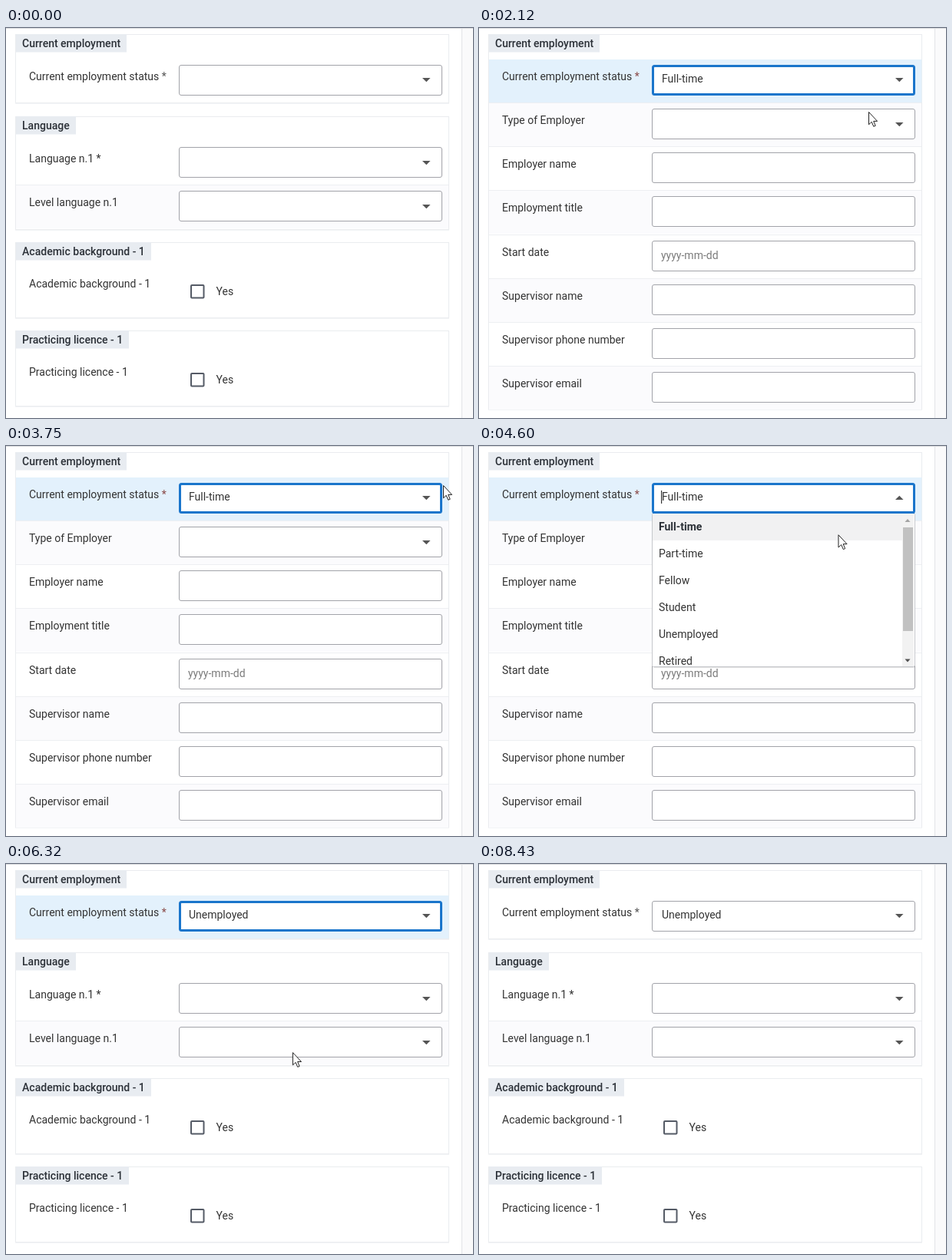
An HTML page for the animation above (8530 ms loop, 608 by 508 pixels).

```html
<!DOCTYPE html>
<html lang="en">
<head>
<meta charset="utf-8">
<title>Employment form</title>
<style>
html, body { margin: 0; width: 100%; height: 100%; overflow: hidden; background: #fff; }
svg { display: block; font: 14px Roboto, sans-serif; fill: #333; }
.title, .bold { font-weight: 500; fill: #2b3037; }
.bold { font-weight: 700; }
.hint { fill: #7b7b7b; }
.field { fill: #fff; stroke: #a2a3a9; }
.card { fill: #fff; stroke: #eaecef; }
.tag { fill: #e8ecf1; }
.odd { fill: #fbfbfd; }
.line { stroke: #edeff2; }
.arrow { fill: #555; }
.box { fill: #fff; stroke: #555b66; stroke-width: 2; }
.pointer { fill: #fff; stroke: #222; stroke-linejoin: round; }
</style>
</head>
<body>
<svg id="stage" width="608" height="508" viewBox="0 0 608 508"></svg>
<script>
const LOOP = 8530, ROW = 57.15;
const OPEN_1 = 1070, PICK_1 = 2120, OPEN_2 = 4130, PICK_2 = 6120, BLUR = 7700;
const SHOW = 110, HIDE = 7800;
const options = ['Full-time', 'Part-time', 'Fellow', 'Student', 'Unemployed', 'Retired'];

// time, x, y of the pointer tip
const path = [
  [110, 600, 506], [570, 560, 110], [770, 556, 84], [880, 552, 74], [1340, 552, 74],
  [1530, 512, 104], [1920, 507, 109], [2200, 507, 109], [2910, 575, 465], [3070, 588, 470],
  [3270, 588, 468], [3750, 569, 51], [3840, 569, 51], [4050, 549, 70], [4330, 549, 70],
  [4700, 450, 125], [5110, 378, 205], [5280, 375, 232], [5400, 375, 232], [5560, 374, 243],
  [5960, 371, 248], [6370, 373, 245], [6520, 380, 238], [7220, 523, 93], [7310, 523, 93],
  [7600, 581, 104]
];

const text = (x, y, s, cls = '') => `<text x="${x}" y="${y}" class="${cls}">${s}</text>`;
const rect = (x, y, w, h, cls, extra = '') =>
  `<rect x="${x}" y="${y}" width="${w}" height="${h}" class="${cls}" ${extra}/>`;
const field = y => rect(225.5, y + .5, 342, 39, 'field', 'rx="2.5"');
const down = y => `<path class="arrow" d="M542 ${y}h10.5l-5.2 5.3z"/>`;
const up = y => `<path class="arrow" d="M542 ${y}h10.5l-5.2-5.3z"/>`;

function card(top, height, title, tagWidth) {
  return rect(12.5, top + .5, 564, height, 'card') +
    `<path class="line" d="M12 ${top + height + 1.2}h565"/>` +
    rect(13, top, tagWidth, 23.5, 'tag') + text(21, top + 16.5, title, 'title');
}

function row(top, i, label, kind = '') {
  const y = top + Math.round(i * ROW);
  return (i % 2 ? rect(13, y + 33, 563, 56, 'odd') : '') +
    (i ? `<path class="line" d="M13 ${y + 32.5}h563"/>` : '') +
    text(30, y + 60, label) + field(y + 40) +
    (kind === 'select' ? down(y + 58) : '') +
    (kind === 'date' ? text(237, y + 293 - 235 + 6, 'yyyy-mm-dd', 'hint') : '');
}

const check = (top, title, tagWidth) =>
  card(top, 98, title, tagWidth) + text(30, top + 59, title) +
  rect(241, top + 56, 16.5, 16.5, 'box', 'rx="1"') + text(273.5, top + 68.5, 'Yes');

const shortForm = card(8, 89, 'Current employment', 144) +
  card(115, 147, 'Language', 78) +
  row(115, 0, 'Language n.1 *', 'select') + row(115, 1, 'Level language n.1', 'select') +
  check(279, 'Academic background - 1', 176) + check(394, 'Practicing licence - 1', 147);

const longForm = card(8, 488, 'Current employment', 144) + [
  ['Type of Employer', 'select'], ['Employer name'], ['Employment title'], ['Start date', 'date'],
  ['Supervisor name'], ['Supervisor phone number'], ['Supervisor email']
].map(([label, kind], i) => row(8, i + 1, label, kind)).join('');

const arrowShape = 'M.5 .5V16.8L4.2 13.3 6.8 19.3 9.2 18.3 6.7 12.4H11.6Z';
const handShape = 'M-1.7 13V1.6a1.6 1.6 0 0 1 3.2 0V8.2q2.6-1.4 3 .8 2.4-1 2.8.9 2.6-.6 2.6 1.8' +
  'V16q0 2.5-1.8 4.5V23H.2V20.8L-4.8 14.2q-1.4-2.4.6-2.8 1.4-.2 2.5 1.6ZM1.5 8v4.5M4.5 9v3.5M7.3 10v2.5';

function pointerAt(t) {
  const next = path.findIndex(p => p[0] > t);
  if (next < 1) return path[next < 0 ? path.length - 1 : 0].slice(1);
  const [t0, x0, y0] = path[next - 1], [t1, x1, y1] = path[next];
  const u = (t - t0) / (t1 - t0), e = u * u * (3 - 2 * u);
  return [x0 + (x1 - x0) * e, y0 + (y1 - y0) * e];
}

function statusRow(focus, open, value, caret) {
  return (focus ? rect(13, 41, 563.5, 56, '', 'fill="#e3f1fc"') : '') +
    text(30, 68, `Current employment status <tspan fill="${focus ? '#8a4a48' : '#555'}">*</tspan>`) +
    (focus ? rect(226.5, 49.5, 340, 37, '', 'rx="2" fill="#fff" stroke="#1a75cb" stroke-width="3"')
           : field(48)) +
    text(238, 71, value) + (open ? up(70) : down(65)) +
    (caret ? rect(237, 58, 1.2, 17, '') : '');
}

function dropdown(value, hover) {
  const items = options.map((name, i) => {
    const top = 88 + 35 * i, chosen = name === value;
    const fill = i === hover ? '#f1f1f2' : chosen ? '#f9f9fb' : '#fff';
    return rect(226, top, 325, Math.min(35, 287 - top), '', `fill="${fill}"`) +
      text(234, top + 22, name, chosen ? 'bold' : '');
  }).join('');
  return rect(226, 89, 342, 200, '', 'rx="3" fill="#000" opacity=".12"') +
    rect(225.5, 87.5, 342, 200, '', 'rx="2" fill="#fff" stroke="#c6c8cc"') + items +
    rect(551, 88, 15, 199, '', 'fill="#f2f2f2"') + rect(552, 106, 13, 135, '', 'fill="#c1c1c1"') +
    '<path d="M554.5 99h7l-3.5-4z" fill="#a3a3a3"/><path d="M554.5 277.5h7l-3.5 4z" fill="#505050"/>' +
    '<path d="M226 87h341" stroke="#1a75cb" stroke-width="2"/>';
}

function scene(t) {
  const first = t >= OPEN_1 && t < PICK_1, second = t >= OPEN_2 && t < PICK_2;
  const open = first || second;
  const value = t < PICK_1 ? '' : t < PICK_2 ? 'Full-time' : 'Unemployed';
  const caret = open && (t - (first ? OPEN_1 : OPEN_2)) % 1060 < 530;
  const [x, y] = pointerAt(t);
  const hover = Math.max(0, Math.floor((y - 93) / 35));
  const overSelect = x > 226 && x < 567 && y > 50 && y < 88;
  return rect(593, 0, 15, 508, '', 'fill="#fafafb"') +
    '<path d="M593.5 0V508" stroke="#e2e4e7"/><path d="M0 .5H608" stroke="#dcdde0"/>' +
    (t >= PICK_1 && t < PICK_2 ? longForm : shortForm) +
    statusRow(t >= OPEN_1 && t < BLUR, open, value, caret) +
    (open ? dropdown(value, hover) : '') +
    (t >= SHOW && t < HIDE
      ? `<path class="pointer" transform="translate(${x} ${y})" d="${overSelect ? handShape : arrowShape}"/>`
      : '');
}

const stage = document.getElementById('stage');
function draw() {
  stage.innerHTML = scene(performance.now() % LOOP);
  requestAnimationFrame(draw);
}
draw();
</script>
</body>
</html>
```
